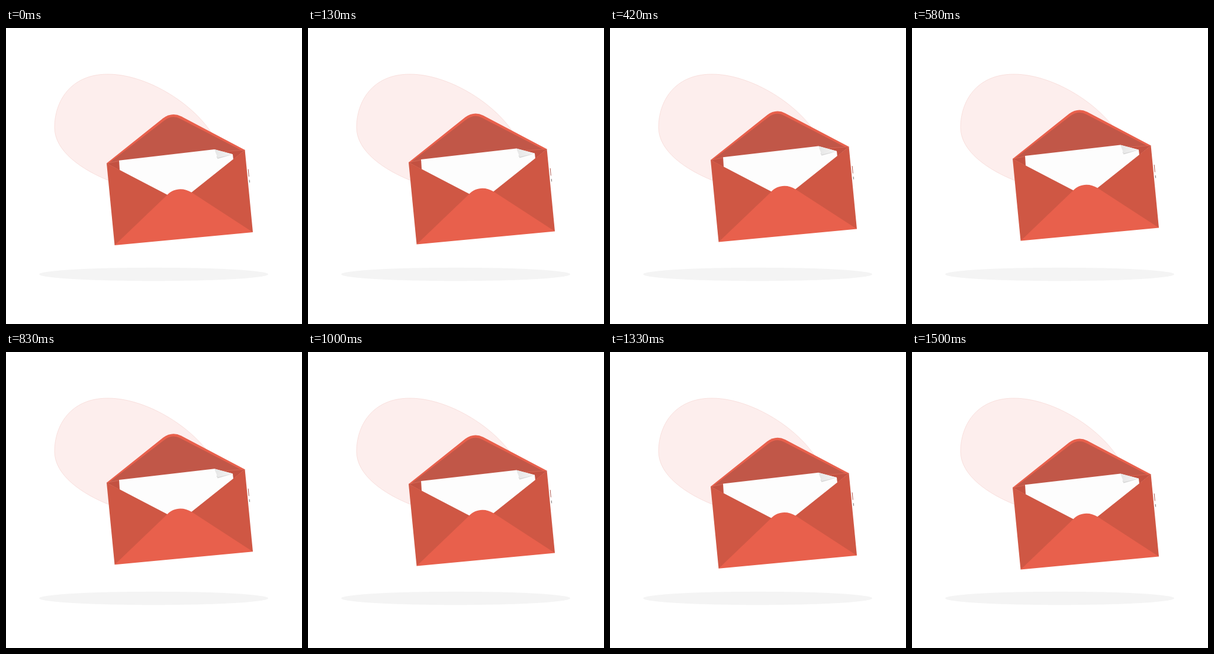
An HTML page that plays this animation: 500x500 px, repeating every 1.54 s.

```html
<!DOCTYPE html>
<html lang="en">
<head>
<meta charset="utf-8">
<title>Floating envelope</title>
<style>
  html, body { margin: 0; width: 100%; height: 100%; overflow: hidden; background: #fff; }
  svg { display: block; width: 100vw; height: 100vh; }
</style>
</head>
<body>
<svg viewBox="0 0 500 500">
  <defs>
    <linearGradient id="curl" x1="0" y1="0" x2="1" y2="0">
      <stop offset="0" stop-color="#e6e6e6"/>
      <stop offset="1" stop-color="#f4f4f4"/>
    </linearGradient>
  </defs>

  <path fill="#fdeeed" stroke="#f3c9c4" stroke-width=".5"
    d="M172 257C130 240 82 209 82 168C82 125 108 78 172 78C236 78 313 125 347 177L300 260Z"/>
  <ellipse cx="249.5" cy="416" rx="193.5" ry="11.3" fill="#f4f4f4"/>

  <g id="envelope">
    <!-- open flap and inside -->
    <path fill="#e8604c" d="M170 228.5L265.5 152.3Q280.5 141.5 296 149.3L403.5 206L313 279L273 283Z"/>
    <path fill="#c15748" d="M174 228L267.5 156.2Q281 146 294 153.3L398 206.8L313 279L273 283Z"/>
    <path fill="#c35141" d="M170 228.5L403.5 206L313 279L273 283Z"/>
    <path fill="none" stroke="#e8705c" stroke-width=".6" d="M170 228.7L191 224.3M364 208.8L403.5 206.2"/>

    <!-- letter -->
    <path fill="#fdfdfd" d="M191 223.7L352 205L383 213.3L384 222L313 279L296 290L273 283L192 240Z"/>
    <path fill="#d6d6d6" d="M355.5 217L357.5 221L372 216.8L383 213.3Z"/>
    <path fill="url(#curl)" d="M352 205L383 213.3L357.5 219.3Z"/>

    <!-- front panels -->
    <path fill="#cf5744" d="M170 228.5L273 282L296 300L183.5 367Z"/>
    <path fill="#cf5744" d="M403.5 206L313 278L290 300L417 345Z"/>
    <path fill="#e8604c" d="M183.5 367L271.5 282.8C283 270 300 269.5 313.5 277.8L417 345Z"/>

    <path fill="none" stroke="#a9473a" stroke-width=".9" d="M409.2 238.5L410.3 251"/>
    <path fill="none" stroke="#6b6260" stroke-width=".9" d="M411.2 256.5L411.6 261"/>
  </g>
</svg>
<script>
  const LOOP = 1540, STEP = 1000 / 24, PEAK = 715, RISE = 10;
  const envelope = document.getElementById("envelope");

  // The motion advances in 24 steps a second, on a 10 ms clock.
  function stepAt(ms) {
    let k = Math.floor(ms / STEP) + 1;
    while (k > 0 && Math.round(k * STEP / 10) * 10 > ms) k--;
    return Math.min(k, 36);
  }

  // Linear rise and fall, highest at PEAK.
  function height(t) {
    const d = Math.abs(t - PEAK);
    return RISE * Math.min(d, LOOP - d) / (LOOP / 2);
  }

  function draw(ms) {
    const y = height(stepAt(ms % LOOP) * STEP) - height(0);
    envelope.setAttribute("transform", `translate(0 ${y.toFixed(3)})`);
  }

  const start = performance.now();
  function tick() {
    draw(performance.now() - start);
    requestAnimationFrame(tick);
  }
  tick();
</script>
</body>
</html>
```
